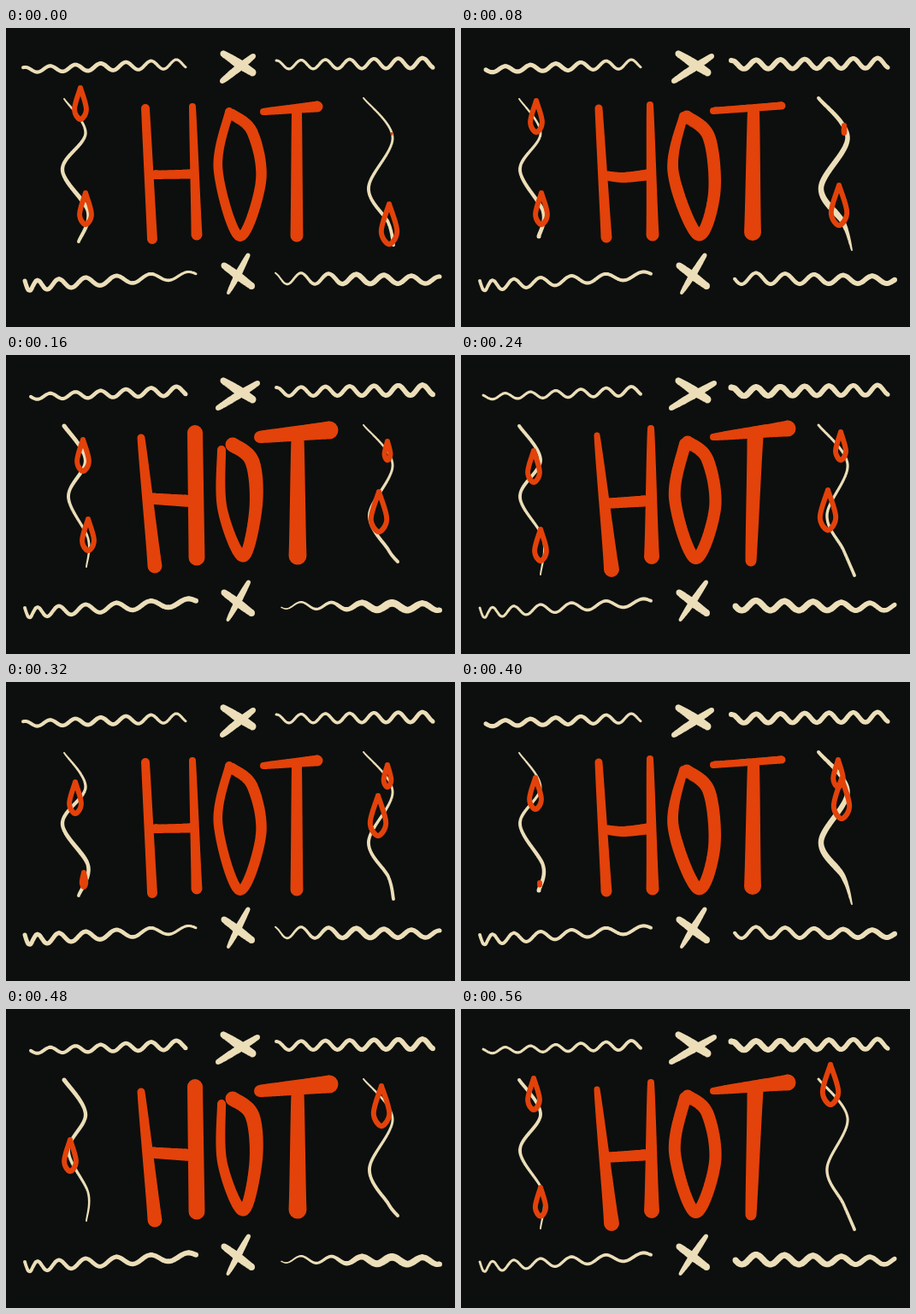
Write an HTML page with a canvas that moves like this. It is 525x350 px and loops after 640 ms.

```html
<!DOCTYPE html>
<html lang="en">
<head>
<meta charset="utf-8">
<title>Hot</title>
<style>
html, body { margin: 0; width: 100%; height: 100%; overflow: hidden; background: #0c0f0e; }
canvas { display: block; width: 525px; height: 350px; }
</style>
</head>
<body>
<canvas id="stage" width="525" height="350"></canvas>
<script>
const ctx = document.getElementById('stage').getContext('2d');
const STEP = 80, STEPS = 8;

const lerp = (a, b, t) => a + (b - a) * t;
const spline = (a, b, c, d, t) =>
  b + t * (c - a + t * (2 * a - 5 * b + 4 * c - d + t * (3 * (b - c) + d - a))) / 2;

// Width at t along a stroke with evenly spaced brush widths.
function widthAt(widths, t) {
  const at = t * (widths.length - 1);
  const i = Math.min(Math.floor(at), widths.length - 2);
  return lerp(widths[i], widths[i + 1], at - i);
}

function brush(color, widths, coords) {
  const count = coords.length / 2;
  const at = (i, axis) => coords[2 * Math.max(0, Math.min(count - 1, i)) + axis];
  ctx.fillStyle = color;
  ctx.beginPath();
  for (let i = 0; i < count - 1; i++) {
    const length = Math.hypot(at(i + 1, 0) - at(i, 0), at(i + 1, 1) - at(i, 1));
    const parts = Math.ceil(length * 1.5) || 1;
    for (let k = 0; k <= parts; k++) {
      const t = k / parts;
      const [x, y] = [0, 1].map(axis =>
        spline(at(i - 1, axis), at(i, axis), at(i + 1, axis), at(i + 2, axis), t));
      const r = widthAt(widths, (i + t) / (count - 1)) / 2;
      ctx.moveTo(x + r, y);
      ctx.arc(x, y, r, 0, 2 * Math.PI);
    }
  }
  ctx.fill();
}
const cream = (widths, ...coords) => brush('#ecdeb8', widths, coords);
const red = (widths, ...coords) => brush('#e3420a', widths, coords);

// Wavy line with a crest wherever phase(x, t) is whole.
function wave(x0, y0, x1, y1, amp0, amp1, phase, widths) {
  const coords = [];
  for (let i = 0; i <= 60; i++) {
    const t = i / 60, x = lerp(x0, x1, t);
    coords.push(x, lerp(y0, y1, t) - lerp(amp0, amp1, t) * Math.cos(2 * Math.PI * phase(x, t)));
  }
  cream(widths, ...coords);
}
const topLeft = (x0, ...widths) =>
  wave(x0, 49, 210, 42, 3, 5.5, x => (x - 199) / 29.5, widths);
const topRight = (...widths) =>
  wave(316, 43, 499, 41, 5, 6, x => (x - 487) / 28.4, widths);
const bottomLeft = (...widths) =>
  wave(22, 302, 222, 289, 6, 4, (x, t) => 6.2 * t ** 0.7, widths);
const bottomRight = (x0, period, amp, ...widths) =>
  wave(x0, 293, 507, 295, amp, 4, x => (x - 345) / period, widths);

const leftStem = (waist, endX, endY, ...widths) =>
  cream(widths, 68, 83, 93, 123, waist, 166, 96, 215, endX, endY);
const rightStem = (waist, endX, endY, ...widths) =>
  cream(widths, 418, 82, 452, 128, waist, 187, 447, 228, endX, endY);

function stroke(x, y, dx, dy, ...widths) {
  cream(widths, x - dx, y - dy, x + dx, y + dy);
}
function crosses(topReach, bottomReach) {
  stroke(271, 41, 17, 11, 7, 11, 9);
  stroke(271, 47.5, topReach, -14.5, 6, 9, 6);
  stroke(271, 290, 16, 12, 7, 10, 8);
  stroke(271.5, 288, bottomReach, -22, 4, 8, 5);
}

const poses = [
  () => {
    topLeft(20, 4, 5, 3);
    topRight(3, 5);
    bottomLeft(5, 5, 3);
    bottomRight(315, 32.3, 7, 2, 6, 5);
    leftStem(66, 85, 250, 2, 4, 5, 4);
    rightStem(424, 453, 254, 2, 4, 4);
    crosses(18, 11.5);
    red([10, 12], 163, 94, 171, 247);
    red([10, 11], 170, 172, 217, 171);
    red([8, 13], 218, 92, 223, 242);
    red([10, 11, 12, 13, 13], 261, 98, 248, 165, 273, 244, 298, 180, 288, 122, 264, 101);
    red([8, 13], 301, 98, 364, 92);
    red([12, 15], 340, 98, 340, 243);
  },
  () => {
    topLeft(29, 5, 5, 3);
    topRight(6, 5);
    bottomLeft(4, 4);
    bottomRight(320, 34, 7, 4, 6);
    leftStem(69, 91, 244, 2, 4, 5);
    rightStem(421, 457, 260, 4, 6, 7, 2);
    crosses(22, 13.5);
    red([9, 13], 161, 94, 170, 245);
    red([11, 13], 170, 173, 190, 175, 218, 172);
    red([8, 15], 221, 90, 224, 242);
    red([10, 14, 14, 15, 15], 260, 103, 248, 168, 277, 242, 296, 195, 290, 128, 264, 104);
    red([8, 9], 295, 97, 375, 91);
    red([14, 20], 342, 97, 341, 239);
  },
  () => {
    topLeft(29, 4, 5);
    topRight(4, 6);
    bottomLeft(4, 6);
    bottomRight(322, 35.5, 4, 1.5, 4, 9, 6);
    leftStem(73, 94, 248, 5, 4, 2);
    rightStem(425, 458, 242, 2, 4, 4);
    crosses(23, 12);
    red([9, 17], 158, 97, 174, 247);
    red([13, 14], 168, 168, 214, 171);
    red([18, 19], 221, 91, 223, 237);
    red([10, 12, 14, 17, 17], 252, 111, 253, 180, 277, 236, 292, 180, 288, 125, 265, 105);
    red([14, 21], 297, 96, 378, 88);
    red([15, 21], 341, 98, 341, 235);
  },
  () => {
    topLeft(26, 3, 4);
    topRight(7, 5);
    bottomLeft(3, 4);
    bottomRight(321, 33.3, 6, 7, 7, 5);
    leftStem(69, 93, 257, 4, 4, 2);
    rightStem(428, 460, 258, 3, 4);
    crosses(25, 15);
    red([7, 18], 159, 94, 176, 251);
    red([12, 13], 168, 174, 215, 171);
    red([8, 18], 222, 86, 223, 236);
    red([14, 14, 15], 262, 104, 250, 168, 274, 238, 297, 180, 288, 122, 265, 102);
    red([8, 19], 295, 96, 382, 86);
    red([19, 13], 344, 97, 339, 241);
  }
];

// Teardrop outline, standing on its round end.
function flame(x, tip, height) {
  const line = Math.min(6, height * 0.7);
  const half = Math.max(0, height * 0.46 - line) / 2;
  const top = tip + line / 2, base = tip + height - line / 2;
  const side = lerp(top, base, 0.68);
  red([line, line], x, top, x - half, side, x, base, x + half, side, x, top);
}

// Flame tips, one x, y pair per step.
const falling = [85, 78, 87, 67, 88, 82, 90, 96, 85, 109, 81, 114, 87, 109, 75, 150,
  93, 206, 93, 190, 94, 190, 96, 189, 93, 201, 91, 220, 92, 232];
const rising = [448, 203, 442, 181, 436, 157, 429, 155, 435, 130, 445, 110, 439, 87, 432, 62];
const kindling = [451, 122, 448, 111, 446, 98, 444, 87, 446, 94, 441, 88];

// Draws every flame of a track alive at this step, one starting per loop.
function flames(track, start, heightAt) {
  for (let i = (start + STEPS) % STEPS; i < track.length / 2; i += STEPS) {
    const x = track[2 * i], tip = track[2 * i + 1];
    flame(x, tip, heightAt(tip));
  }
}

let shown = -1;
function render(now) {
  const step = Math.floor(now / STEP) % STEPS;
  if (step === shown) return;
  shown = step;
  ctx.fillStyle = '#0c0f0e';
  ctx.fillRect(0, 0, 525, 350);
  poses[step % poses.length]();
  flames(falling, step + 1, tip => Math.min(43, 1.2 * (239 - tip)));
  flames(kindling, step, tip => 126 - tip);
  flames(rising, step, () => 53);
}
function tick() {
  render(performance.now());
  requestAnimationFrame(tick);
}
tick();
</script>
</body>
</html>
```
